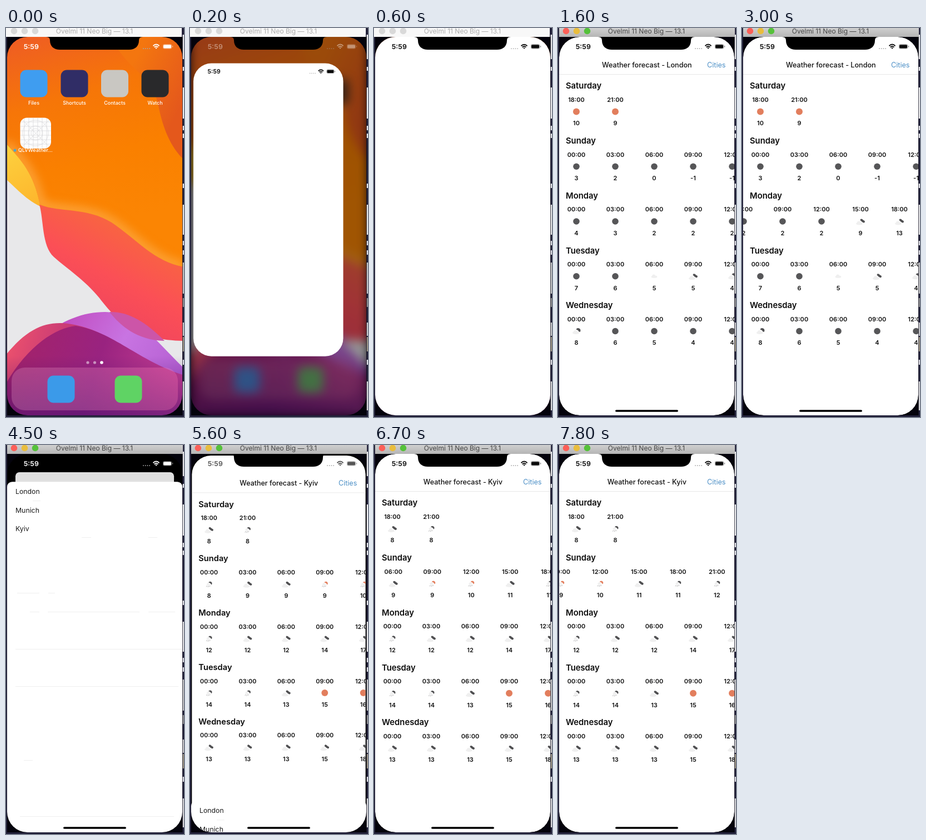
Write an HTML page with a canvas that moves like this. It is 320x700 px and loops after 8000 ms.

```html
<!DOCTYPE html>
<html lang="en">
<head>
<meta charset="utf-8">
<title>Weather forecast</title>
<style>
html, body { margin: 0; width: 100%; height: 100%; overflow: hidden; background: #000; }
canvas { display: block; width: 320px; height: 700px; }
</style>
</head>
<body>
<canvas id="stage" width="320" height="700"></canvas>
<script>
const W = 320, H = 700, LOOP = 8000;
const SCREEN = { x: 2, y: 16, w: 315, h: 681, r: 37 };
const FACE = 'Inter, "Open Sans", sans-serif';
const stage = document.getElementById('stage').getContext('2d');
let c = stage;

const lerp = (a, b, k) => a + (b - a) * k;
const clamp = k => Math.max(0, Math.min(1, k));
const easeOut = k => 1 - Math.pow(1 - clamp(k), 2.2);
// Critically damped spring from 0 to 1
const spring = (t, start, rate) => {
  const x = Math.max(0, t - start) / 1000 * rate;
  return 1 - (1 + x) * Math.exp(-x);
};

function rect(x, y, w, h, fill) {
  c.fillStyle = fill;
  c.fillRect(x, y, w, h);
}
function round(x, y, w, h, r, fill) {
  c.beginPath();
  c.roundRect(x, y, w, h, r);
  if (fill) { c.fillStyle = fill; c.fill(); }
}
function dot(x, y, r, fill) {
  c.beginPath();
  c.arc(x, y, r, 0, Math.PI * 2);
  c.fillStyle = fill;
  c.fill();
}
function shape(d, fill) {
  c.fillStyle = fill;
  c.fill(new Path2D(d));
}
function stroke(d, color, width) {
  c.strokeStyle = color;
  c.lineWidth = width;
  c.stroke(new Path2D(d));
}
function text(s, x, y, size, weight, fill, align = 'center') {
  c.font = `${weight} ${size}px ${FACE}`;
  c.textAlign = align;
  c.textBaseline = 'alphabetic';
  c.fillStyle = fill;
  c.fillText(s, x, y + size * 0.36);
}
function grad(x0, y0, x1, y1, ...colors) {
  const g = c.createLinearGradient(x0, y0, x1, y1);
  colors.forEach((col, i) => g.addColorStop(i / (colors.length - 1), col));
  return g;
}
function layer(draw) {
  const cv = document.createElement('canvas');
  cv.width = W;
  cv.height = H;
  c = cv.getContext('2d');
  draw();
  c = stage;
  return cv;
}

// ---- Home screen ----
const wallpaper = layer(() => {
  rect(0, 0, W, H, '#e8e8ea');
  shape('M0 200 L0 272 C25 295 45 318 80 328 L90 200Z', grad(0, 210, 60, 320, '#fdd23f', '#fdb52c'));
  shape('M60 318 C68 345 64 392 86 412 C112 435 140 452 168 486 C200 528 235 562 320 563 L320 300Z',
    grad(250, 370, 160, 540, '#f8663f', '#fb4f56', '#ee425f'));

  const edge = 'M0 208 C28 238 50 262 61 318 C95 332 145 322 190 350 C235 380 265 420 320 430';
  const orange = new Path2D(edge + ' L320 0 L0 0Z');
  c.fillStyle = grad(0, 30, 110, 380, '#ef5e22', '#f67608', '#fa8000', '#fb8503');
  c.fill(orange);
  c.save();
  c.clip(orange);
  c.filter = 'blur(9px)';
  stroke(edge, '#fdab45', 14);
  c.filter = 'none';
  c.restore();

  shape('M185 0 C205 75 262 75 274 140 C282 180 296 215 320 237 L320 0Z',
    grad(220, 80, 320, 130, '#f4760f', '#e4581c'));
  shape('M60 560 C100 525 140 511 178 511 C235 511 275 570 320 612 L320 700 L60 700Z',
    grad(100, 520, 300, 640, '#c04cc0', '#c874e2', '#b560d2'));
  shape('M186 511 C205 535 235 562 285 563 C250 528 220 510 186 511Z', '#cc55a8');
  shape('M0 588 C35 545 65 530 100 531 C180 535 235 600 320 625 L320 700 L0 700Z',
    grad(0, 560, 300, 670, '#ee526c', '#b02c7c', '#c0408f'));
  shape('M0 640 C40 570 90 540 125 536 C190 545 240 600 320 625 L320 700 L0 700Z',
    grad(20, 560, 310, 650, '#a3226a', '#992380', '#c83f92'));
  rect(0, 590, W, 110, grad(0, 590, 0, 700, 'rgba(70,15,110,0)', 'rgba(70,15,110,.6)'));
});

const icons = layer(() => {
  const apps = [['Files', 50, '#3f9df0'], ['Shortcuts', 123, '#302d66'],
    ['Contacts', 195.5, '#c9c7c2'], ['Watch', 268, '#29292b']];
  for (const [name, x, color] of apps) {
    round(x - 24.5, 75.5, 49, 49, 11, color);
    text(name, x, 135, 9, 500, '#fff');
  }
  dot(147, 602, 2.6, '#ffffff80');
  dot(159.5, 602, 2.6, '#ffffff80');
  dot(172, 602, 2.8, '#fff');
  round(10, 611, 299, 77, 24, grad(10, 0, 309, 0, 'rgba(225,150,195,.3)', 'rgba(255,120,180,.3)'));
  round(74.5, 625.5, 49, 49, 11, '#3b9ae9');
  round(195.5, 625.5, 49, 49, 11, '#5fd364');
});

function blankIcon() {
  round(25.5, 161.5, 55.5, 55.5, 12, '#fdfdfd');
  c.save();
  c.clip();
  c.strokeStyle = '#d2d2d6';
  c.lineWidth = 0.6;
  c.beginPath();
  for (let i = 1; i < 7; i++) {
    const p = i * 8;
    c.moveTo(25 + p, 161); c.lineTo(25 + p, 218);
    c.moveTo(25, 161 + p); c.lineTo(82, 161 + p);
  }
  c.moveTo(25, 161); c.lineTo(82, 218);
  c.moveTo(82, 161); c.lineTo(25, 218);
  for (const r of [8, 13, 23]) {
    c.moveTo(53 + r, 189);
    c.arc(53, 189, r, 0, Math.PI * 2);
  }
  c.stroke();
  c.restore();
  dot(16, 220, 2.6, '#55a5c4');
  text('QLVWeather…', 22, 220, 9, 500, '#fff', 'left');
}

function home(p) {
  const { x, y, w, h, r } = SCREEN;
  c.save();
  round(x, y, w, h, r);
  c.clip();
  c.filter = p > 0.01 ? `blur(${11 * p}px)` : 'none';
  c.drawImage(wallpaper, 0, 0);
  c.save();
  const s = 1 - 0.07 * p;
  c.globalAlpha = 1 - 0.25 * p;
  c.translate(159.5, 356.5);
  c.scale(s, s);
  c.translate(-159.5, -356.5);
  c.drawImage(icons, 0, 0);
  c.restore();
  c.filter = 'none';
  if (p === 0) blankIcon();
  rect(0, 0, W, H, `rgba(0,0,0,${0.44 * p})`);
  c.globalAlpha = 1 - 0.7 * p;
  status('#fff');
  c.restore();
}

// ---- Phone furniture ----
function status(color) {
  text('5:59', 45.3, 33.3, 12.4, 600, color);
  for (let i = 0; i < 4; i++) dot(247 + i * 3.7, 37, 0.9, '#a9a9a9');
  c.lineCap = 'butt';
  stroke('M264.5 32.2 Q270 27 275.5 32.2', color, 1.9);
  stroke('M266.6 34.6 Q270 31.4 273.4 34.6', color, 1.9);
  shape('M268.2 35.8 Q270 34.4 271.8 35.8 L270 37.8Z', color);
  round(282.2, 29.4, 15.6, 7.8, 2.4);
  c.save();
  c.globalAlpha *= 0.45;
  c.strokeStyle = color;
  c.lineWidth = 0.8;
  c.stroke();
  round(298.8, 31.8, 1.4, 3, 0.7, color);
  c.restore();
  round(283, 30.2, 14, 6.2, 1.6, color);
}

function notch() {
  shape('M72 16 Q79 16 79 22 C79 33 86 39 97 39 H221 C232 39 239 33 239 22 Q239 16 246 16Z', '#000');
}

function desktop() {
  rect(0, 0, W, H, '#22213a');
  const strip = [[12, 44, '#e4e4e6'], [70, 7, '#e8e8ee'], [107, 56, '#f0f0f2'], [176, 8, '#e8e8ee'],
    [190, 8, '#e8e8ee'], [280, 8, '#e8e8ee'], [318, 54, '#e6e6e8'], [383, 8, '#dedee6'],
    [400, 8, '#dedee6'], [422, 56, '#c4c4c6'], [486, 16, '#8d8d90'], [530, 24, '#c9c9cc'],
    [556, 26, '#9b9486'], [597, 9, '#dedee6'], [636, 52, '#d5d5d8']];
  for (const [y, h, col] of strip) rect(317.5, y, 2.5, h, col);
}

function titleBar(active) {
  rect(active ? 2 : 0, 0, 316, 16, active ? grad(0, 0, 0, 16, '#cfcfcf', '#b5b5b5') : '#f8f8f8');
  const lights = active ? ['#fb5f58', '#e9bd3d', '#55c13a'] : ['#d9d9d9', '#d9d9d9', '#d9d9d9'];
  lights.forEach((col, i) => dot(14.5 + i * 19, 5.5, 5.8, col));
  text('Ovelmi 11 Neo Big — 13.1', 159, 6, 12, 400, active ? '#454545' : '#adadad');
}

// ---- Weather table: one letter per sky, then the temperature ----
const DAYS = ['Saturday', 'Sunday', 'Monday', 'Tuesday', 'Wednesday'];
const FORECAST = {
  London: ['s10 s9', 'n3 n2 n0 n-1 n-1', 'n4 n3 n2 n2 n2 b9 b13 b11', 'n7 n6 c5 b5 f4', 'f8 n6 n5 n4 n4'],
  Kyiv: ['b8 r8', 'r8 b9 b9 R9 R10 b11 r11 r12', 'r12 b12 b12 b14 b17', 'r14 r14 b13 s15 s16', 'b13 b13 b13 b15 b18']
};
const DARK = '#4f4f51', SUN = '#e27e5d', PALE = '#efefef';

function cloud(x, y, k) {
  c.fillStyle = PALE;
  c.beginPath();
  c.ellipse(x, y + k, 6 * k, 2.4 * k, 0, 0, 7);
  c.ellipse(x - k, y - k, 3 * k, 2.6 * k, 0, 0, 7);
  c.fill();
}
function sky(kind, x, y) {
  if (kind === 's') return dot(x, y, 6, SUN);
  if (kind === 'n') return dot(x, y, 5.8, '#565658');
  if (kind === 'c') return cloud(x, y, 0.9);
  c.lineCap = 'round';
  if (kind === 'b') {
    cloud(x - 2, y + 3, 1);
    stroke(`M${x + 1.5} ${y - 2.6} l1.2 .6 M${x + 3.4} ${y - 1} l2.6 1.5`, DARK, 3.8);
  } else if (kind === 'f') {
    shape(`M${x - .5} ${y - 3} a4.2 4.2 0 0 1 8 1.5 q0 2 -1 3 q-3 -.5 -3.5 -3 z`, DARK);
    cloud(x - 1, y + 2, 1);
  } else {
    shape(`M${x - 1} ${y - 3} a3.6 3.6 0 0 1 6.6 1.6 q0 1.5 -1.4 2.6 q-1 -3.2 -5.2 -4.2z`, kind === 'R' ? SUN : DARK);
    cloud(x - 1, y, 0.6);
    stroke(`M${x - 3.4} ${y + 3} l-1 1.8 M${x - .4} ${y + 3} l-1.4 2.4 M${x + 2} ${y + 3} l-.8 1.4`, '#a9a9aa', 0.9);
  }
}

function forecast(city, scrollDay, offset, loaded) {
  rect(2, 83, 315, 0.8, '#e3e3e3');
  text('Weather forecast - ' + city, 159.8, 66, 12.6, 500, '#111');
  text('Cities', 301.5, 66, 12.6, 400, '#4b8fc6', 'right');
  if (!loaded) return;
  DAYS.forEach((day, d) => {
    const y = 104 + d * 98.75;
    text(day, 14, y, 14.8, 600, '#0c0c0c', 'left');
    FORECAST[city][d].split(' ').forEach((cell, i) => {
      const x = 33 + i * 70 - (d === scrollDay ? offset : 0);
      const hour = (d ? 0 : 18) + i * 3;
      text(String(hour).padStart(2, '0') + ':00', x, y + 25, 11, 600, '#111');
      sky(cell[0], x, y + 46.5);
      text(cell.slice(1), x, y + 67.5, 11, 600, '#111');
    });
  });
}

function cityList(top, picked) {
  c.save();
  c.translate(0, top - 66);
  round(2, 66, 315, 660, [9, 9, 0, 0], '#fff');
  if (picked) rect(2, 133.3, 315, 33.4, '#d9d9dc');
  ['London', 'Munich', 'Kyiv'].forEach((name, i) => text(name, 17, 83.5 + i * 33.4, 12.3, 400, '#1c1c1c', 'left'));
  const rules = [[100, 48, 62], [166, 136, 153], [166, 256, 272], [266, 20, 60], [266, 76, 88],
    [300, 43, 60], [300, 75, 240], [300, 256, 304], [367, 17, 317], [434, 17, 310], [567, 32, 48], [668, 25, 302]];
  for (const [y, a, b] of rules) rect(a, y, b - a, 0.8, '#ebebeb');
  c.restore();
}

// ---- Scenes ----
function launch(p) {
  home(p);
  if (p === 0) return;
  const s = SCREEN;
  const w = lerp(55, s.w, p), h = lerp(55, s.h, Math.pow(p, 1.46));
  const x = lerp(53, s.x + s.w / 2, p) - w / 2, y = lerp(189, s.y + s.h / 2, p) - h / 2;
  c.save();
  round(x, y, w, h, lerp(11, s.r, p), '#fff');
  c.clip();
  c.translate(x, y);
  c.scale(w / s.w, w / s.w);
  c.translate(-s.x, -s.y);
  status('#0a0a0a');
  c.restore();
}

function app(t) {
  const { x, y, w, h, r } = SCREEN;
  // k: how far the city sheet is up
  const k = t < 5353 ? spring(t, 3850, 16) : 1 - spring(t, 5353, 16);
  const kyiv = t >= 5100;
  const offset = kyiv ? 237.5 * spring(t, 6400, 6.5) : 170 * easeOut((t - 2540) / 260);

  c.save();
  round(x, y, w, h, r);
  c.clip();
  rect(0, 0, W, H, '#000');
  const s = 1 - 0.095 * k;
  c.save();
  c.translate(159.5, 16 + 33 * k);
  c.scale(s, s);
  c.translate(-159.5, -16);
  const top = lerp(r, 8, k);
  round(x, y, w, h, [top, top, r, r], '#fff');
  c.clip();
  if (t >= 1100) forecast(kyiv ? 'Kyiv' : 'London', kyiv ? 1 : 2, offset, t >= 1300);
  if (k > 0.002) rect(0, 0, W, H, `rgba(0,0,0,${0.12 * k * k})`);
  c.restore();
  if (k > 0.002) cityList(700 - 634 * k, kyiv);
  const v = Math.round(10 + 245 * clamp(k > 0.5 ? k : Math.sqrt(k * 2) / 1.41));
  status(`rgb(${v},${v},${v})`);
  if (t >= 1100) round(103, 687.2, 113, 3.6, 1.8, '#000');
  c.restore();
}

function draw(t) {
  desktop();
  rect(2, 16, 315.5, 684, '#04030c');
  rect(2, 697, 316, 3, '#22213a');
  if (t < 700) launch(t < 90 ? 0 : spring(t, 48, 20.7));
  else app(t);
  notch();
  titleBar(t >= 1300);
}

function tick() {
  draw(performance.now() % LOOP);
  requestAnimationFrame(tick);
}
tick();
</script>
</body>
</html>
```
